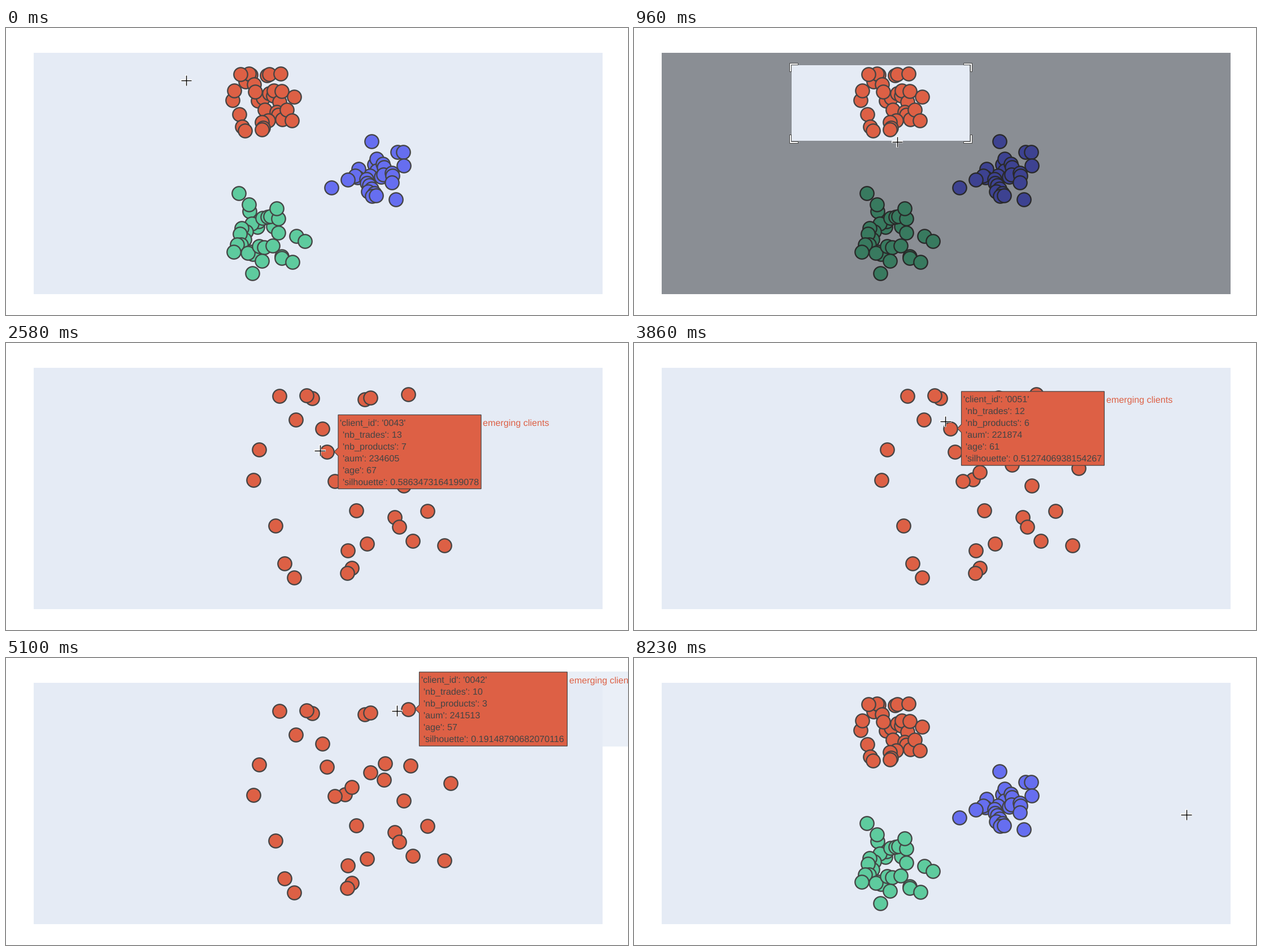
These frames come from a looping animation (1101 by 509 pixels, 9450 ms). A matplotlib script:

```python
import matplotlib.pyplot as plt
import numpy as np
from matplotlib.animation import FuncAnimation
from matplotlib.patches import PathPatch, Polygon, Rectangle
from matplotlib.path import Path

W, H, DPI = 1101, 509, 100
PX = 72 / DPI  # points per pixel
LOOP, INTERVAL = 9450, 45

PLOT_BG, LINE = "#e5ebf5", "#444444"
RED, BLUE, GREEN = "#dd6045", "#666ef0", "#5ecb9e"
LEFT, TOP, RIGHT, BOTTOM = 49, 44, 1055.7, 472
SEL_X, SEL_Y, ZOOM, ASPECT = 279, 66, 3.195, 2.352
UI = 1.2  # scale of the chart's interface elements

ZOOM_IN, ZOOM_OUT = 1220, 7730

# Red cluster in zoomed coordinates, back to front.
red_zoomed = np.array([
    (513, 136), (542, 98), (531.5, 92.5), (484, 94), (559.5, 151.5),
    (600, 242), (581.5, 245), (612, 229), (568, 193), (634.5, 100),
    (645, 96.5), (711.5, 90.5), (438, 243), (447.5, 189), (620, 297),
    (645, 203), (669, 216), (671, 187), (703.5, 253), (715.5, 191),
    (786.5, 222), (688, 309), (696, 325.5), (720, 351), (746, 298),
    (775.5, 358.5), (639, 356), (604.5, 367.5), (612, 398.5), (604, 408),
    (477, 323.5), (493, 391), (509.5, 416)])
red_home = (red_zoomed - (LEFT, TOP)) / ZOOM + (SEL_X, SEL_Y)

blue_home = np.array([
    (647, 200.5), (693, 220), (703, 219.5), (703.5, 244), (651.5, 242),
    (655.5, 231.5), (656, 253), (644, 262), (666.5, 240.5), (669, 247),
    (663.5, 263.5), (668, 260), (683, 257), (684, 261.5), (682.5, 273.5),
    (624, 250), (621.5, 265), (618, 262), (605, 268.5), (576, 283),
    (638, 268), (638.5, 275), (643, 279), (646.5, 284.5), (641, 289.5),
    (652, 293), (647.5, 297.5), (654.5, 297), (690, 304)])

green_home = np.array([
    (411.5, 293), (430.5, 324.5), (430, 313), (444.5, 353), (447, 343),
    (435, 346.5), (472.5, 352), (454, 336.5), (463, 335), (468, 333.5),
    (482, 338), (478.5, 320), (482, 362.5), (425, 361), (416.5, 354.5),
    (422, 375), (414, 364.5), (415.5, 383.5), (409, 383.5), (403, 397),
    (433, 397), (437, 401), (427.5, 399), (447.5, 386.5), (457, 389),
    (472, 385.5), (514, 368.5), (529, 378), (488, 405), (487.5, 407.5),
    (507, 415), (452.5, 412.5), (436, 435)])

# Screen updates come in bursts: first and last time, number of steps.
BURSTS = [(0, 0, 1), (80, 960, 12), (1220, 1220, 1), (1900, 2140, 4),
          (2580, 2990, 6), (3160, 3160, 1), (3860, 4020, 3), (4530, 4860, 5),
          (5020, 5260, 4), (6650, 7140, 7), (7570, 7810, 4)]
TICKS = np.concatenate([np.linspace(*burst) for burst in BURSTS])

# Pointer path: time, x, y.
POINTER = np.array([
    (0, 319, 93), (80, 343, 107.4), (160, 373, 132), (240, 392, 147),
    (400, 421, 169), (640, 450, 190), (880, 465, 200), (960, 466, 202),
    (1820, 466, 202), (2140, 559, 192), (2500, 559, 192), (2580, 555.5, 190.5),
    (2990, 556, 157), (3080, 556, 157), (3160, 558, 161), (3780, 558, 161),
    (4020, 538, 95), (4450, 538, 95), (4530, 566, 95.5), (4860, 672, 97),
    (4940, 672, 97), (5260, 712, 90), (6570, 712, 90), (6650, 713, 91.5),
    (6810, 766, 118), (6980, 896, 203), (7140, 974, 254), (7490, 974, 254),
    (7650, 977.5, 278)])

# Start, end, point, then the record: id, trades, products, aum, age, silhouette.
TOOLTIPS = [
    (2140, 2800, 8, ("0043", 13, 7, 234605, 67, "0.5863473164199078")),
    (2800, 3930, 4, ("0051", 12, 6, 221874, 61, "0.5127406938154267")),
    (3930, 4600, 2, ("0065", 13, 5, 205613, 55, "0.3448570031458321")),
    (4770, 5010, 10, ("0058", 11, 4, 238290, 59, "0.3716052948370152")),
    (5090, 6720, 11, ("0042", 10, 3, 241513, 57, "0.19148790682070116"))]
FIELDS = ("client_id", "nb_trades", "nb_products", "aum", "age", "silhouette")

plt.rcParams["text.hinting"] = "none"
fig = plt.figure(figsize=(W / DPI, H / DPI), dpi=DPI, facecolor="white")
ax = fig.add_axes([0, 0, 1, 1])
ax.set(xlim=(0, W), ylim=(H, 0))
ax.axis("off")
ax.add_patch(Rectangle((LEFT, TOP), RIGHT - LEFT, BOTTOM - TOP, fc=PLOT_BG, lw=0))


def cluster(points, color):
    return ax.scatter(*points.T, s=(24.4 * PX) ** 2, c=color, edgecolors=LINE,
                      linewidths=2.3 * PX, zorder=2)


def label(color):
    return ax.text(0, 0, "", family="Liberation Sans", size=16.1 * PX,
                   color=color, va="baseline", zorder=6)


green, red, blue = [cluster(*args) for args in (
    (green_home, GREEN), (red_home, RED), (blue_home, BLUE))]

shade = ax.add_patch(PathPatch(Path([(0, 0)]), fc="black", alpha=0.395, lw=0, zorder=3))
corners = [ax.add_patch(Polygon([(0, 0)], fc="white", ec=LINE, lw=PX,
                                joinstyle="miter", zorder=4)) for _ in range(4)]

name_bg = ax.add_patch(Rectangle((0, 0), 0, 0, fc=PLOT_BG, alpha=0.8, lw=0, zorder=5))
bubble = ax.add_patch(Polygon([(0, 0)], fc=RED, ec=LINE, lw=UI * PX,
                              joinstyle="miter", zorder=5))
lines = [label(LINE) for _ in FIELDS]
name = label(RED)
name.set_text("emerging clients")
tooltip_parts = [name_bg, bubble, name, *lines]

pointer = [ax.plot([], [], color=color, lw=width * PX, solid_capstyle="butt",
                   zorder=8)[0]
           for color, width in (("white", 3.8), ("black", 1.4))]


def pointer_at(time):
    return [np.interp(time, POINTER[:, 0], POINTER[:, k]) for k in (1, 2)]


def draw_pointer(time):
    x, y = pointer_at(time)
    for line, arm in zip(pointer, (10.4, 9.4)):
        line.set_data([x - arm, x + arm, np.nan, x, x],
                      [y, y, np.nan, y - arm, y + arm])


def draw_selection(time):
    visible = 80 <= time < ZOOM_IN
    for part in (shade, *corners):
        part.set_visible(visible)
    if not visible:
        return
    height = pointer_at(time - 80)[1] - SEL_Y  # the box trails the pointer
    x0, y0, x1, y1 = SEL_X, SEL_Y, SEL_X + height * ASPECT, SEL_Y + height
    outer = [(LEFT, TOP), (RIGHT, TOP), (RIGHT, BOTTOM), (LEFT, BOTTOM), (LEFT, TOP)]
    hole = [(x0, y0), (x0, y1), (x1, y1), (x1, y0), (x0, y0)]
    codes = [Path.MOVETO] + [Path.LINETO] * 3 + [Path.CLOSEPOLY]
    shade.set_path(Path(outer + hole, codes * 2))

    out, inn, arm = -3.5 * UI, -0.5 * UI, 9.5 * UI
    bracket = np.array([(out, arm), (inn, arm), (inn, inn), (arm, inn),
                        (arm, out), (out, out)])
    places = [(x0, y0, 1, 1), (x1, y0, -1, 1), (x1, y1, -1, -1), (x0, y1, 1, -1)]
    for corner, (x, y, sx, sy) in zip(corners, places):
        corner.set_xy(bracket * (sx, sy) + (x, y))


def draw_tooltip(time):
    shown = [tip for tip in TOOLTIPS if tip[0] <= time < tip[1]]
    for part in tooltip_parts:
        part.set_visible(bool(shown))
    if not shown:
        return
    _, _, index, record = shown[0]
    x, y = red_zoomed[index]
    half, arrow = 65.6, 6 * UI
    left = x + 20
    right = left + 253 + 8.95 * (len(record[-1]) - 18)
    bubble.set_xy([(left - arrow, y), (left, y + arrow), (left, y + half),
                   (right, y + half), (right, y - half), (left, y - half),
                   (left, y - arrow)])
    name_bg.set_bounds(right, y - half - 1, 124, 2 * half + 2)
    baseline = y - 46.2
    name.set_position((right + 3.4, baseline))
    for k, (line, field, value) in enumerate(zip(lines, FIELDS, record)):
        shown_value = f"'{value}'" if k == 0 else value
        line.set_text(f"'{field}': {shown_value}")
        line.set_position((left + 3.4 + (4.5 if k else 0), baseline + 20.93 * k))


def update(frame):
    elapsed = (frame + 1) * INTERVAL - 1
    time = TICKS[np.searchsorted(TICKS, elapsed, side="right") - 1]
    zoomed = ZOOM_IN <= time < ZOOM_OUT
    red.set_offsets(red_zoomed if zoomed else red_home)
    blue.set_visible(not zoomed)
    green.set_visible(not zoomed)
    draw_selection(time)
    draw_tooltip(time)
    draw_pointer(time)
    return []


anim = FuncAnimation(fig, update, frames=LOOP // INTERVAL, interval=INTERVAL,
                     init_func=lambda: [], repeat=True, repeat_delay=0)
plt.show()
```
